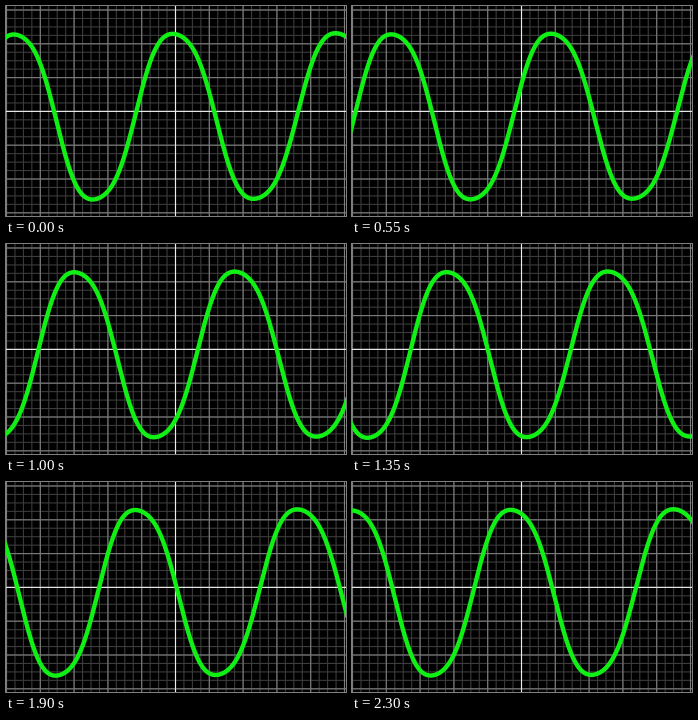
Animation, 340 px wide and 210 px high, one loop 2.35 s. Source, as a matplotlib script:

```python
import numpy as np
import matplotlib.pyplot as plt
from matplotlib.animation import FuncAnimation

W, H, DPI = 340, 210, 100
FRAMES, INTERVAL = 47, 50
CX, CY = 169.5, 105.4
CELL, SUB = 33.8, 4
PX = 72 / DPI

fig = plt.figure(figsize=(W / DPI, H / DPI), dpi=DPI, facecolor="black")
ax = fig.add_axes([0, 0, 1, 1])
ax.set_xlim(0, W)
ax.set_ylim(H, 0)
ax.axis("off")


def cross(x, y, color, z):
    style = dict(color=color, lw=1.1 * PX, zorder=z, snap=False)
    ax.axvline(x, **style)
    ax.axhline(y, **style)


def grid(step, color, z):
    for k in range(-24, 25):
        cross(CX + k * step, CY + k * step, color, z)


grid(CELL / SUB, "#3c3c3c", 1)
grid(CELL, "#7c7c7c", 2)
cross(CX, CY, "#ececec", 3)
ax.set_xlim(0, W)
ax.set_ylim(H, 0)

xs = np.linspace(-5, W + 5, 700)
dx = xs - 170
# The wavelength grows slightly from left to right.
cycles = dx / 161 - 4.8e-7 * dx ** 2
middle = 110.5 - 0.004 * dx

# Third harmonic: rounder crests, leaning a little to the left.
ROUND, LEAN = 0.055, 0.015

# Uneven travel, in sixtieths of a wavelength.
KEY_FRAMES = [0, 11, 20, 27, 31, 38, 46, 47]
KEY_STEPS = [0, 12, 23, 33, 38, 46, 57, 60]

wave, = ax.plot([], [], color="#10f014", lw=4.4 * PX, zorder=4)


def draw(i):
    shift = np.interp(i, KEY_FRAMES, KEY_STEPS) / 60 - 0.0075
    a = 2 * np.pi * (cycles - shift)
    shape = np.cos(a) - ROUND * np.cos(3 * a) - LEAN * np.sin(3 * a)
    wave.set_data(xs, middle - 82.5 * shape / (1 - ROUND))
    return wave,


anim = FuncAnimation(fig, draw, frames=FRAMES, interval=INTERVAL,
                     repeat=True, repeat_delay=0)
plt.show()
```
